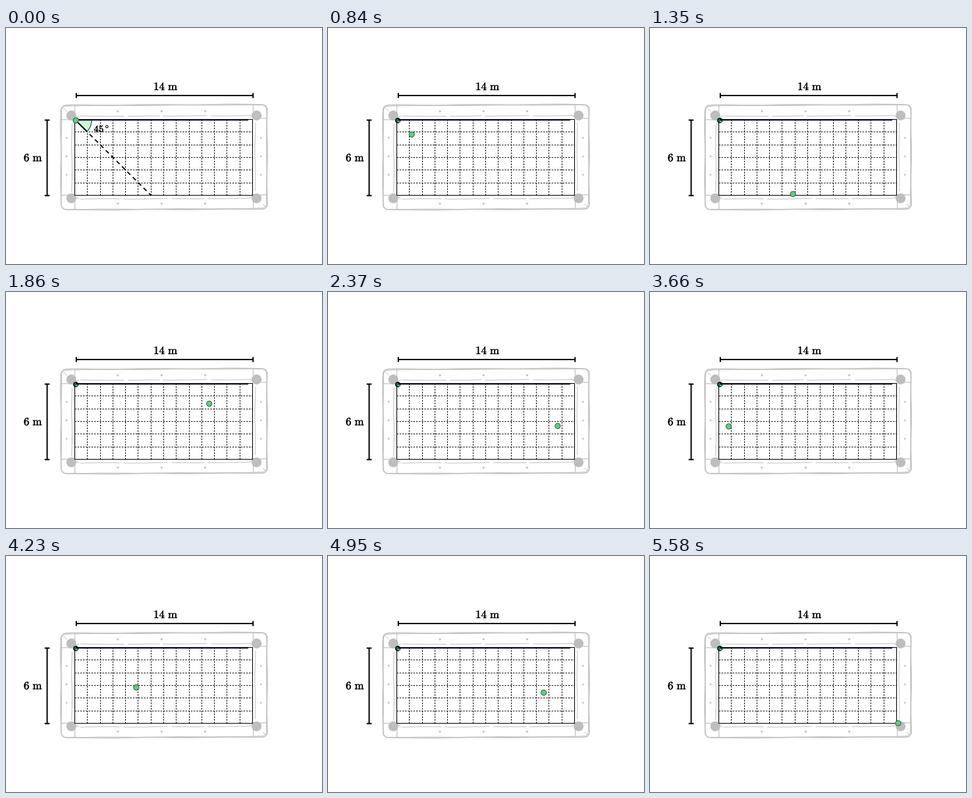
Recreate the animation shown at these times as a matplotlib script. Size 480 by 360 pixels, loop 5.61 s.

```python
import numpy as np
import matplotlib.pyplot as plt
from matplotlib.animation import FuncAnimation
from matplotlib.collections import LineCollection
from matplotlib.patches import Arc, Circle, Rectangle, Wedge
from matplotlib.patheffects import withStroke

WIDTH, HEIGHT, DPI = 480, 360, 100
INTERVAL, FRAMES = 30, 187
HINT_END, ROLL_START, ROLL_END = 12, 24, 174
PT = 72 / DPI

GREY, POCKET = "#c2c2c2", "#bebebe"
INK, NAVY = "#000000", "#0b0a1c"
GREEN, PALE_GREEN, RIM = "#5fcb87", "#c8f6d6", "#245a3a"

LEFT, TOP, RIGHT, BOTTOM = 104.5, 139.5, 374.5, 255.3
COLUMNS, ROWS = 14, 6
START = np.array([106, 141])

# Where the ball starts, touches each cushion and stops.
BOUNCES = np.array([
    START, (220.3, 256.5), (337.5, 142.3), (374.2, 179), (297, 256.3),
    (183, 142.5), (107.9, 216.6), (144.6, 253), (257.4, 141.7), (376.9, 255),
])
TRAVEL = np.append(0, np.cumsum(np.hypot(*np.diff(BOUNCES, axis=0).T)))

rng = np.random.default_rng(4)
plt.rcParams.update({"mathtext.fontset": "cm", "path.snap": False})
fig = plt.figure(figsize=(WIDTH / DPI, HEIGHT / DPI), dpi=DPI, facecolor="white")
ax = fig.add_axes([0, 0, 1, 1])
ax.set(xlim=(0, WIDTH), ylim=(HEIGHT, 0))
ax.axis("off")


def line(x, y, color=INK, width=1.0, **style):
    style.setdefault("solid_capstyle", "butt")
    return ax.plot(x, y, color=color, lw=width * PT, **style)[0]


def disc(x, y, radius, color, edge="none", width=0.0, z=2):
    return ax.add_patch(Circle((x, y), radius, fc=color, ec=edge, lw=width * PT, zorder=z))


def label(x, y, text, size=17, **style):
    return ax.text(x, y, text, fontsize=size * PT, color=INK, va="baseline",
                   path_effects=[withStroke(linewidth=0.35 * PT, foreground=INK)], **style)


def pencil(x, y, width=1.2, sway=0.4):
    """Grey curve with a slight hand-drawn sway and the table's small tilt."""
    phase = rng.uniform(0, 6)
    tilt = 1.2 * (x - LEFT) / (RIGHT - LEFT)
    line(x + sway * np.sin(y / 13 + phase), y - tilt + sway * np.sin(x / 19 + phase),
         GREY, width, zorder=1, solid_capstyle="round")


def stroke(x0, y0, x1, y1, **style):
    pencil(np.linspace(x0, x1, 40), np.linspace(y0, y1, 40), **style)


def rounded_outline(margin, radius, width):
    """Trace a rounded rectangle as a large inner box swept by a small circle."""
    a = np.linspace(0, 2 * np.pi, 1200)
    half_w, half_h = 156.6 - margin, 79.8 - margin
    reach = np.clip(np.abs(np.tan(a)), 0, 1e6)
    power = 2 * half_w / radius
    scale = 1 / ((1 + reach ** power) ** (1 / power))
    x = np.sign(np.cos(a)) * scale * half_w
    y = np.sign(np.sin(a)) * reach * scale * half_h
    # Round the corners by pulling in whatever lies beyond the corner circle.
    ox, oy = np.abs(x) - (half_w - radius), np.abs(y) - (half_h - radius)
    over = np.where((ox > 0) & (oy > 0), np.hypot(ox, oy) / radius, 1).clip(1)
    x = np.where(over > 1, np.sign(x) * (half_w - radius + ox / over), x)
    y = np.where(over > 1, np.sign(y) * (half_h - radius + oy / over), y)
    pencil(240 + x, 197.6 + y, width=width)


def draw_table():
    rounded_outline(0, 8, 1.7)
    rounded_outline(0.8, 8, 0.9)
    for x, rail, cushion in ((LEFT, 84, 100), (RIGHT + 0.8, 396, 378.5)):
        side = np.sign(rail - x)
        stroke(x, 118, x, 139)
        stroke(x, 256, x, 276)
        stroke(cushion, 146, cushion, 250, width=1)
        for y, lip in ((TOP, 134.6), (BOTTOM, 261)):
            stroke(rail, y, x, y)
            stroke(x + side * 4, y, x - side * 6, lip, width=1)
            disc(x + side * 5.3, lip - 1.2, 7.5, POCKET)
    for y in (134.6, 261):
        ends = np.linspace(110, 372, 5) + rng.uniform(-8, 8, 5) * [0, 1, 1, 1, 0]
        for a, b in zip(ends, ends[1:]):
            stroke(a + 3, y, b - 3, y, width=1)
    for k in range(3):
        for y in (127, 268):
            disc(170 + 66.3 * k, y, 1.6, GREY)
        for x in (92, 387.4):
            disc(x, 167.5 + 28.2 * k, 1.4, GREY)
    for x, y in ((88, 123), (390, 270)):
        for step in (0, 2.5):
            stroke(x + step, y + step, x + step + 1.6, y + step + 1.2, width=1, sway=0)


def draw_grid():
    ax.add_patch(Rectangle((LEFT, TOP), RIGHT - LEFT, BOTTOM - TOP,
                           fc="white", ec=INK, lw=1.1 * PT, zorder=3))
    xs = np.floor(np.linspace(LEFT, RIGHT, COLUMNS + 1)[1:-1]) + 0.5
    ys = np.floor(np.linspace(TOP, BOTTOM, ROWS + 1)[1:-1]) + 0.5
    segments = [[(x, TOP), (x, BOTTOM)] for x in xs]
    segments += [[(LEFT, y), (RIGHT, y)] for y in ys]
    ax.add_collection(LineCollection(segments, colors=INK, linewidths=PT,
                                     linestyles=(0, (2.4, 1.8)), zorder=4))
    line([START[0], 368], [140.2, 140.2], NAVY, 2.1, zorder=5)


def draw_dimensions():
    x0, x1, y, x, y0, y1 = 106.8, 375.3, 103, 62.5, 140.5, 255.6
    cap = np.array([-3.8, 3.8])
    line([x0, x1], [y, y], width=2)
    line([x, x], [y0, y1], width=2)
    for end in (x0, x1):
        line([end, end], y + cap, width=2)
    for end in (y0, y1):
        line(x + cap, [end, end], width=2)
    label(243, 94.6, r"$\mathrm{14\ m}$", ha="center")
    label(41.6, 203.2, r"$\mathrm{6\ m}$", ha="center")


def draw_start_mark():
    x, y = START
    disc(x + 0.1, y + 0.1, 3.4, "#2f7a4c", INK, 1.4, 6)
    line([x, x + 4], [140.2, 140.2], NAVY, 2.1, zorder=7)
    disc(x + 1.5, y + 1.6, 1.4, GREEN, z=7)


def draw_hint():
    (x, y), r = START, 24
    elbow, foot = r * np.sqrt(0.5), BOTTOM - y
    return [
        ax.add_patch(Wedge((x, y), r, 0, 45, fc=PALE_GREEN, ec="none", zorder=8)),
        ax.add_patch(Arc((x, y), 2 * r, 2 * r, theta1=0, theta2=45,
                         ec=RIM, lw=1.2 * PT, zorder=9)),
        line([x, x + r], [140.2, 140.2], NAVY, 2.1, zorder=9),
        line([x, x + elbow], [y, y + elbow], INK, 2, zorder=9),
        line([x + elbow + 4, x + foot], [y + elbow + 4, y + foot], NAVY, 1.9, zorder=9,
             linestyle=(0, (3.4, 2.7)), dash_capstyle="butt"),
        label(133.4, 158.8, r"$45^\circ$", 14.8, ha="left", zorder=10),
    ]


def update(frame):
    """Roll the ball at constant speed along its bounces."""
    distance = np.interp(frame, (ROLL_START, ROLL_END), (0, TRAVEL[-1]))
    ball.center = tuple(np.interp(distance, TRAVEL, axis) for axis in BOUNCES.T)
    for part in hint:
        part.set_visible(frame < HINT_END)
    return [ball, *hint]


draw_table()
draw_grid()
draw_dimensions()
draw_start_mark()
hint = draw_hint()
ball = disc(*START, 4.1, GREEN, RIM, 0.9, 12)

anim = FuncAnimation(fig, update, frames=FRAMES, interval=INTERVAL,
                     init_func=lambda: update(0), repeat=True, repeat_delay=0)
plt.show()
```
